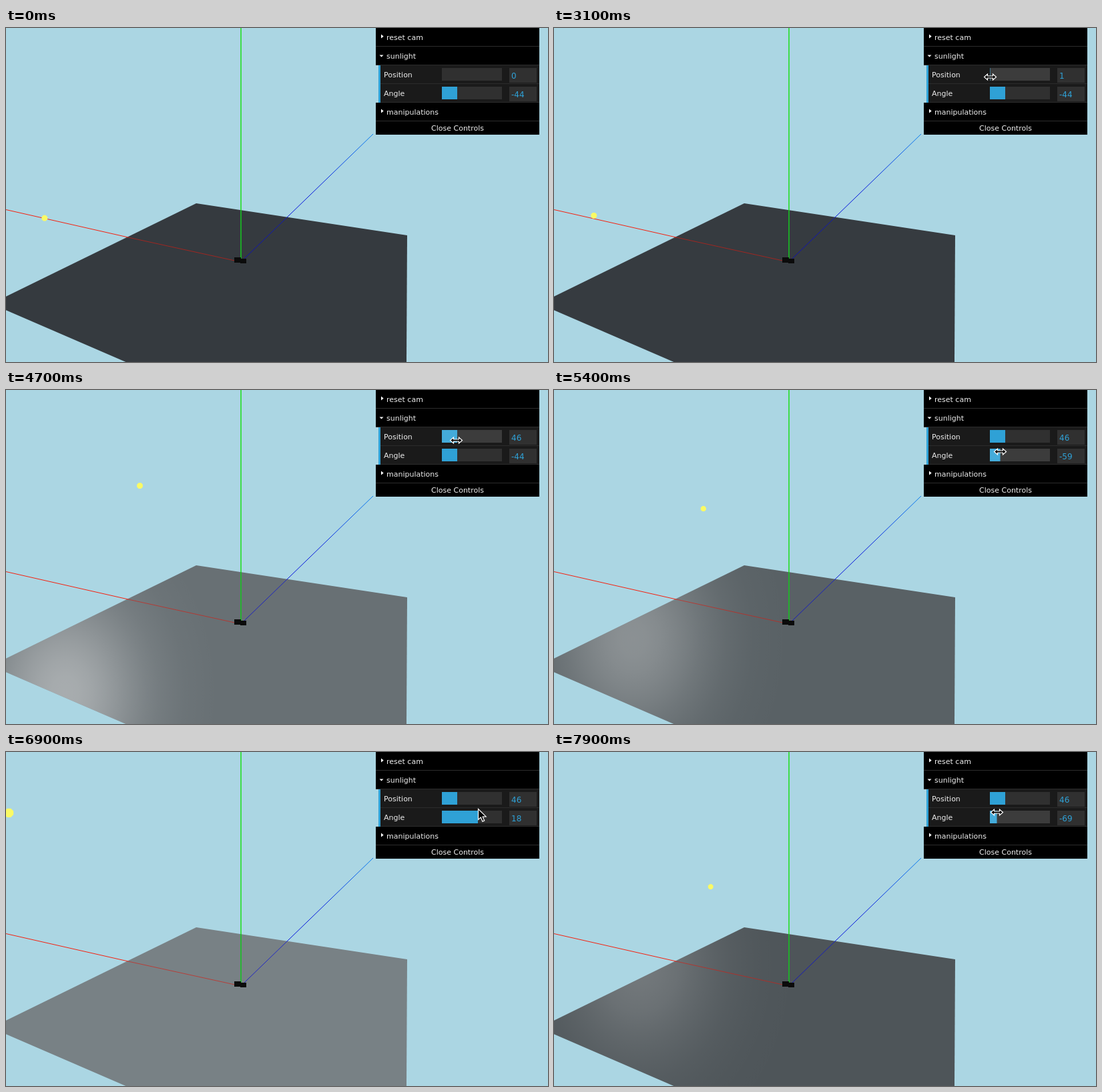
Recreate the animation shown at these times as an HTML page with a canvas. Size 812 px wide and 501 px high, loop 8 s.

```html
<!DOCTYPE html>
<html>
<head>
<meta charset="utf-8">
<title>Sunlight controls</title>
<style>
  html, body { margin: 0; width: 100%; height: 100%; overflow: hidden; background: #abd6e3; }
  canvas { display: block; }
</style>
</head>
<body>
<canvas id="stage" width="812" height="501"></canvas>
<script>
const ctx = document.getElementById('stage').getContext('2d');
const LOOP = 8000, STEP = 100;
const BLUE = '#2fa1d6', BLUE_HOVER = '#44abda';
const SLIDER_X = 653, SLIDER_W = 90;

// Camera looking at the origin from distance 1
const FOCAL = 459.5, CX = 353, CY = 351;
const RAD = Math.PI / 180, TILT = 27.6 * RAD, YAW = 25.7 * RAD;
const ORBIT = 0.982, ORBIT_SIDE = 0.74;

function ease(t, from, to) {
  const k = Math.min(1, Math.max(0, (t - from) / (to - from)));
  return k * k * (3 - 2 * k);
}

function pointerAt(t) {
  const enter = ease(t, 700, 1300), reach = ease(t, 1500, 1800);
  const nextRow = ease(t, 4600, 5000);
  const out = ease(t, 5600, 6700), back = ease(t, 6700, 7900);
  return [
    588 + 61 * enter + 4 * reach + 0.5 * ease(t, 2000, 2100)
      + 22.5 * ease(t, 3100, 4500) - 7.5 * nextRow + 42 * out - 47 * back,
    13 + 51 * enter + 9 * reach + 19 * nextRow - 7 * out + 5 * back
  ];
}

function rect(x, y, w, h, color) {
  ctx.fillStyle = color;
  ctx.fillRect(x, y, w, h);
}

function path(points, close = true) {
  ctx.beginPath();
  points.forEach(([x, y]) => ctx.lineTo(x, y));
  if (close) ctx.closePath();
}

function shape(points, color) {
  path(points);
  ctx.fillStyle = color;
  ctx.fill();
}

function text(str, x, y, color = '#eee', size = 11, align = 'left') {
  ctx.font = size + 'px "DejaVu Sans", sans-serif';
  ctx.textAlign = align;
  ctx.fillStyle = color;
  ctx.fillText(str, x, y);
}

function line(from, to, color, alpha = 1, width = 1) {
  ctx.globalAlpha = alpha;
  ctx.strokeStyle = color;
  ctx.lineWidth = width;
  path([from, to], false);
  ctx.stroke();
  ctx.globalAlpha = 1;
}

// World coordinates to camera right, up and depth
function toCamera(x, y, z) {
  const right = z * Math.sin(YAW) - x * Math.cos(YAW);
  const ahead = x * Math.sin(YAW) + z * Math.cos(YAW);
  return [
    right,
    y * Math.cos(TILT) + ahead * Math.sin(TILT),
    ahead * Math.cos(TILT) - y * Math.sin(TILT)
  ];
}

const project = ([x, y, z]) => [CX + FOCAL * x / z, CY - FOCAL * y / z];

function sunCoords(position, angle) {
  const p = position * RAD, a = angle * RAD;
  const side = ORBIT_SIDE * Math.sin(p);
  return [Math.cos(p), side * Math.cos(a), -side * Math.sin(a)];
}

function drawFloor([x, y, z]) {
  ctx.save();
  shape([[285, 263], [601, 311], [599, 683], [-22, 413.6]],
    `rgb(${Math.round(53 + 133 * y)},${Math.round(58 + 141 * y)},${Math.round(63 + 138 * y)})`);
  ctx.clip();
  // Highlight near the mirrored light direction, as strong as the light is high
  const glare = toCamera(x, -y, z);
  if (glare[2] > 0.05) {
    const [gx, gy] = project(glare);
    const glow = ctx.createRadialGradient(0, 0, 0, 0, 0, 3);
    for (let i = 0; i <= 12; i++) {
      const bell = Math.exp(-i * i / 32) - 0.011;
      glow.addColorStop(i / 12, `rgba(255,255,255,${1.12 * y * bell})`);
    }
    ctx.translate(gx + 25, gy + 75);
    ctx.scale(80, 100);
    ctx.fillStyle = glow;
    ctx.fillRect(-3, -3, 6, 6);
  }
  ctx.restore();
}

function drawAxes() {
  line([0, 272.5], [183, 314], '#f5210f');
  line([183, 314], [345, 349.5], '#d81d12', 0.65);
  line([352, 0], [352, 273], '#3fdc4a', 1, 2);
  line([352, 273], [352, 346], '#18c022', 0.8, 2);
  const blue = ctx.createLinearGradient(352, 349, 549, 159);
  blue.addColorStop(0, '#0000d8');
  blue.addColorStop(0.6, '#0418dc');
  blue.addColorStop(1, '#0a80f0');
  line([357, 346], [421, 284], blue, 0.75);
  line([421, 284], [550, 159], blue);
}

function drawBlocks() {
  rect(342, 344, 10, 8, '#0b0b0b');
  rect(351, 346, 9, 7, '#0b0b0b');
}

function drawSun(coords) {
  const [right, up, depth] = toCamera(...coords.map(v => v * ORBIT));
  const [x, y] = project([right, up, depth + 1]);
  const r = 6.5 / (depth + 1);
  const corners = Array.from({ length: 8 }, (_, i) => {
    const a = (i + 0.5) * Math.PI / 4;
    return [x + r * Math.cos(a), y + r * Math.sin(a)];
  });
  shape(corners, '#fafa64');
}

function drawTitle(label, y, open) {
  rect(554, y, 245, 27, '#000');
  rect(554, y + 27, 245, 1, '#2c2c2c');
  shape(open ? [[559.5, y + 12.5], [565.5, y + 12.5], [562.5, y + 15.5]]
             : [[562, y + 9.5], [565.7, y + 12.5], [562, y + 15.5]], '#fff');
  text(label, 570, y + 18);
}

function drawRow(label, y, fraction, value, hover) {
  rect(558, y, 3, 28, BLUE);
  rect(561, y, 238, 27, '#1a1a1a');
  rect(561, y + 27, 238, 1, '#2c2c2c');
  text(label, 566, y + 18);
  rect(SLIDER_X, y + 4, SLIDER_W, 19, hover ? '#3c3c3c' : '#303030');
  rect(SLIDER_X, y + 4, SLIDER_W * fraction, 19, hover ? BLUE_HOVER : BLUE);
  rect(754, y + 4, 41, 22, '#303030');
  text(String(value), 757, y + 20, BLUE, 12);
}

function drawCursor(x, y, resize) {
  const half = [[9, 0], [4, 4.5], [4, 1.5], [-4, 1.5], [-4, 4.5]];
  const outline = resize
    ? [...half, ...half.map(([a, b]) => [-a, -b])]
    : [[0, 0], [0, 16], [3.8, 12.6], [6.4, 18.6], [9.2, 17.4], [6.6, 11.6], [11.6, 11.4]];
  ctx.save();
  ctx.translate(Math.floor(x) + 0.5, Math.floor(y) + 0.5);
  shape(outline, '#000');
  ctx.lineWidth = 1.2;
  ctx.strokeStyle = '#fff';
  ctx.stroke();
  ctx.restore();
}

function draw(t) {
  const [mx, my] = pointerAt(t);
  const offset = Math.round(2 * (mx - SLIDER_X));
  const position = t < 2100 ? 0 : t <= 4500 ? offset : 46;
  const angle = t < 5400 ? -44 : offset - 90;
  const over = y => t >= 700 && mx >= SLIDER_X && my >= y + 4 && my < y + 23;
  const sun = sunCoords(position, angle);

  rect(0, 0, 812, 501, '#abd6e3');
  drawFloor(sun);
  drawAxes();
  drawBlocks();
  drawSun(sun);

  drawTitle('reset cam', 0, false);
  drawTitle('sunlight', 28, true);
  drawRow('Position', 56, position / 180, position, over(56));
  drawRow('Angle', 84, (angle + 90) / 180, angle, over(84));
  drawTitle('manipulations', 112, false);
  rect(554, 140, 245, 20, '#000');
  text('Close Controls', 676.5, 154, '#eee', 11, 'center');

  if (t >= 700) drawCursor(mx, my, over(56) || over(84));
}

const start = performance.now();
function tick() {
  const t = (performance.now() - start) % LOOP;
  draw(Math.floor(t / STEP) * STEP);
  requestAnimationFrame(tick);
}
tick();
</script>
</body>
</html>
```
